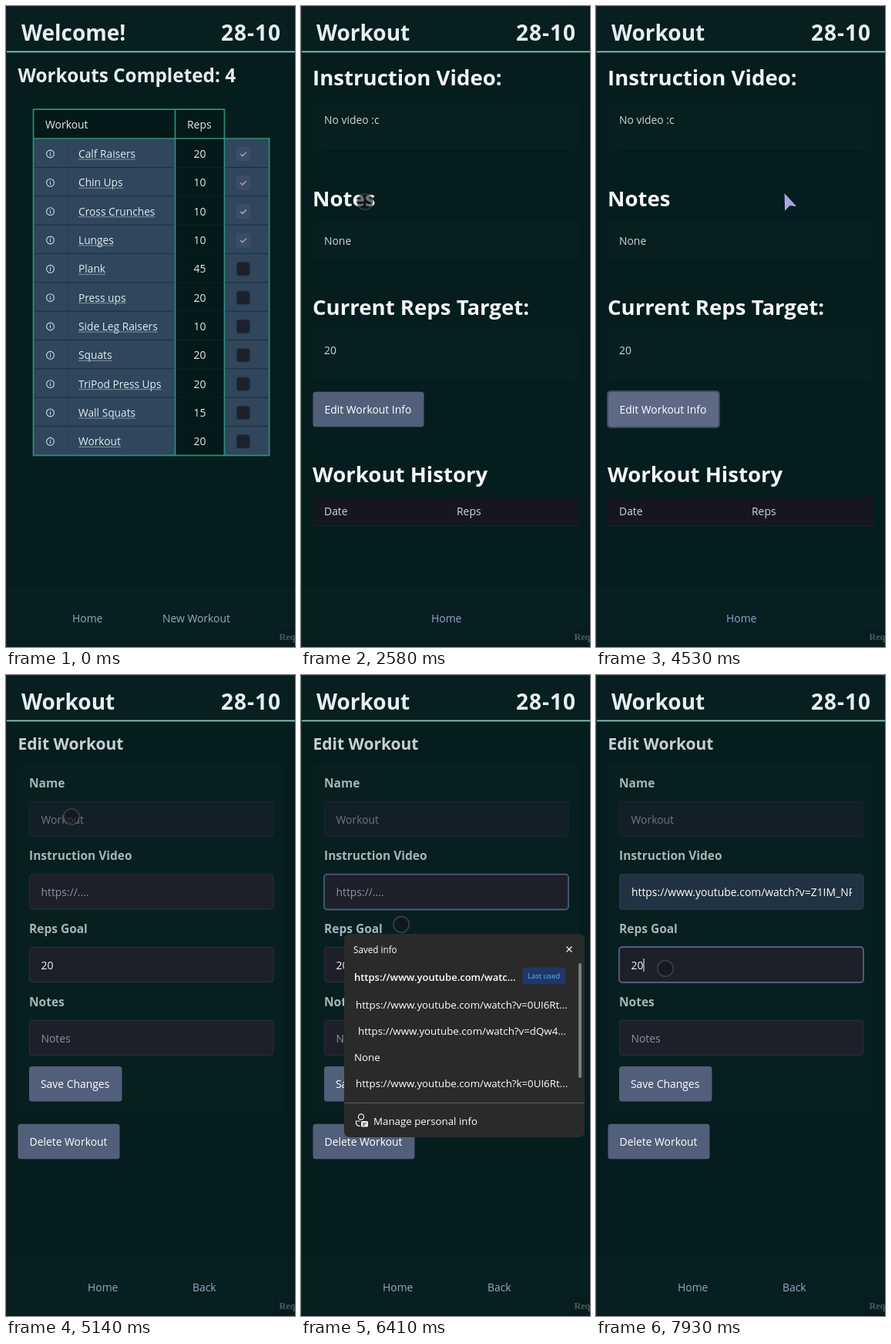
An HTML page that plays this animation: 375 px wide and 832 px high, repeating every 8 s.

```html
<!DOCTYPE html>
<html lang="en">
<head>
<meta charset="utf-8">
<title>Workout tracker</title>
<style>
  html, body { margin: 0; width: 100%; height: 100%; overflow: hidden; background: #051d1e; }
  svg { display: block; width: 100vw; height: 100vh; }
  text { font-family: "Open Sans", "Noto Sans", sans-serif; white-space: pre; }
  .serif { font-family: "Liberation Serif", "Noto Serif", serif; }
</style>
</head>
<body>
<svg id="stage" viewBox="0 0 375 832"></svg>
<script>
const LOOP = 8000;
const TEAL = '#2b8f7c', SLATE = '#525f7a', FIELD = '#1d1f29', NAV = '#98a8c0';
const SOFT = '#d0d6dd', HINT = '#8b93a0';
const BODY = 13.9;
const URL_BASE = 'https://www.youtube.com/watch?';

// Drawing helpers
const text = (x, y, s, size = BODY, fill = SOFT, weight = 400, extra = '') =>
  `<text x="${x}" y="${y}" font-size="${size}" fill="${fill}" font-weight="${weight}" ${extra}>${s}</text>`;
const rect = (x, y, w, h, fill, r = 0, extra = '') =>
  `<rect x="${x}" y="${y}" width="${w}" height="${h}" rx="${r}" fill="${fill}" ${extra}/>`;
const path = (d, stroke, width = 1, extra = '') =>
  `<path d="${d}" fill="none" stroke="${stroke}" stroke-width="${width}" ${extra}/>`;
const group = (id, body) => `<g id="${id}">${body}</g>`;
const h2 = (y, s) => text(15, y, s, 27.6, '#f4f6f8', 700);
const title = s => text(20, 45, s, 28, '#e6eff2', 700);
const button = (x, y, w, s) => rect(x, y, w, 45.5, SLATE, 3.5) + text(x + 15, y + 28, s, BODY, '#fff');
const card = (y, h) =>
  rect(30, y + h, 317, 5, '#041b1c', 3) + rect(15, y, 346, h, '#071f20', 3);
const outline = (id, x, y, w, h, color) =>
  rect(x, y, w, h, 'none', 4, `id="${id}" stroke="${color}" stroke-width="1.8"`);

function frame() {
  return rect(0, 0, 375, 832, '#051d1e') +
    rect(0, 0, 375, 59, '#081f21') +
    rect(0, 755, 375, 77, '#071f21') +
    rect(0, 58.5, 375, 1.8, '#82c6c1') +
    text(279, 45, '28-10', 28, '#e6eff2', 700, 'letter-spacing="1"') +
    rect(348, 808, 27, 24, '#081c20', 3) +
    text(354.5, 823, 'Req', 12, '#4c5b66', 700, 'class="serif"') +
    path('M0.5 832V0.5H375', '#222b2c');
}

const exercises = [
  ['Calf Raisers', 20], ['Chin Ups', 10], ['Cross Crunches', 10], ['Lunges', 10],
  ['Plank', 45], ['Press ups', 20], ['Side Leg Raisers', 10], ['Squats', 20],
  ['TriPod Press Ups', 20], ['Wall Squats', 15], ['Workout', 20]
];
const DONE = 4, ROW = 37.33;

function tableRow([name, reps], i) {
  const y = 192 + i * ROW, done = i < DONE;
  let s = `<circle cx="57.5" cy="${y}" r="4.9" fill="none" stroke="#d3dce4" stroke-width="1.1"/>` +
    path(`M57.5 ${y - 0.9}V${y + 2.6}M57.5 ${y - 2.7}v1.1`, '#d3dce4', 1.1) +
    text(94, y + 5, name, 13.75, '#e4ecf2', 400, 'class="link"') +
    text(251.5, y + 5, reps, BODY, '#e4ecf2', 400, 'text-anchor="middle"') +
    rect(299.3, y - 8.7, 17, 17.4, done ? '#3c4c64' : '#1c212b', 3,
      `stroke="${done ? '#42526a' : '#2a3341'}"`);
  if (done) s += path(`M304.3 ${y + 0.2}l2.6 2.5 4.8 -5`, '#98a4b4', 1.6);
  if (i) {
    const top = y - ROW / 2 - 1.2;
    s += path(`M36 ${top}H219M284 ${top}H341`, '#1b2c3b') + path(`M220 ${top}H283`, '#0b2324');
  }
  return s;
}

function listPage() {
  return title('Welcome!') +
    text(15.5, 99, 'Workouts Completed: 4', 24.3, '#e6edf0', 700) +
    rect(40, 612, 300, 6, '#041b1c', 3) +
    rect(35, 134, 249, 450, '#03191a') +
    rect(35, 172, 185, 412, '#2f465c') + rect(283, 172, 59, 412, '#2f465c') +
    path('M79.5 172V583', '#2a4055') +
    text(51, 158.5, 'Workout', BODY, '#e3ebee') + text(235, 158.5, 'Reps', BODY, '#e3ebee') +
    exercises.map(tableRow).join('') +
    path('M35.5 134.2H283.4V583.4M35.5 133.4V583.4H341.6V172H35.5M219.5 134V583', TEAL, 1.7) +
    text(86, 800, 'Home', BODY, NAV) + text(203, 800, 'New Workout', BODY, NAV);
}

function detailPage() {
  return title('Workout') +
    h2(103, 'Instruction Video:') + card(124, 63) + text(30, 153, 'No video :c') +
    h2(260, 'Notes') + card(279, 50) + text(30, 310, 'None') +
    h2(401, 'Current Reps Target:') + card(421, 65) + text(30, 452, '20') +
    button(15.5, 500.7, 144, 'Edit Workout Info') +
    group('pressed', rect(15, 500, 145, 47, '#5d6985', 4, 'stroke="#3b4a5b" stroke-width="2"') +
      text(30.5, 528.7, 'Edit Workout Info', BODY, '#fff')) +
    h2(618, 'Workout History') + rect(15, 638, 346, 37, '#15171f') +
    path('M15 674.5H361', '#1a232b') +
    text(30, 661, 'Date') + text(202, 661, 'Reps') +
    text(169, 800, 'Home', BODY, '#96a3d2');
}

const label = (y, s) => text(30, y, s, 15.5, '#a7b3bc', 700);
const field = (y, s, fill, bg = FIELD, border = '#2a3040') =>
  rect(30.5, y, 316.5, 45, bg, 3.5, `stroke="${border}"`) + text(45.5, y + 28.3, s, BODY, fill);

function editPage() {
  return title('Workout') +
    text(15.5, 97, 'Edit Workout', 21, '#c7ced8', 700) +
    rect(15, 115, 346, 453, '#071f20', 3) +
    label(146, 'Name') + field(164.5, 'Workout', '#6c7983', '#121f26', '#182830') +
    label(240, 'Instruction Video') + field(259, 'https://....', HINT) +
    group('filled', rect(30.5, 259, 316.5, 45, '#203243', 3.5, 'stroke="#293c4e"') +
      `<clipPath id="inner"><rect x="45" y="262" width="287" height="40"/></clipPath>` +
      text(46, 287, URL_BASE + 'v=Z1IM_NPk4', BODY, '#fff', 400, 'clip-path="url(#inner)"')) +
    outline('videoFocus', 30, 258.7, 317, 45.8, '#465b78') +
    label(334.5, 'Reps Goal') + field(353.5, '20', '#f2f4f6') +
    outline('repsFocus', 30, 353, 317, 46, '#525f84') +
    rect(61.5, 368, 1, 17, '#fff', 0, 'id="caret"') +
    label(430, 'Notes') + field(448.3, 'Notes', HINT) +
    button(30, 508, 120.5, 'Save Changes') + button(15.5, 582.7, 132, 'Delete Workout') +
    text(106, 800, 'Home', BODY, NAV) + text(242, 800, 'Back', BODY, NAV);
}

function popup() {
  const item = (x, y, s, weight = 400, size = 13.3) => text(x, y, s, size, '#fff', weight);
  return rect(56, 336, 312, 264, '#2a2a2a', 7) +
    text(68, 360.5, 'Saved info', 11.7, '#fff') +
    path('M344.5 352.5l7 7m0 -7l-7 7', '#f4f4f4', 1.2) +
    rect(60, 372, 297, 39, '#3b3b3b', 4, 'id="hoverItem"') +
    item(69, 397, 'https://www.youtube.com/watc...', 600, 13) +
    rect(287.3, 379.5, 56.2, 22, '#1f3766', 3) + text(294, 394, 'Last used', 9.5, '#66b6f6') +
    item(71, 433, URL_BASE + 'v=0UI6Rt...') +
    item(74, 467, URL_BASE + 'v=dQw4...') +
    item(69, 501, 'None') +
    item(71, 535, URL_BASE + 'k=0UI6Rt...') +
    rect(360, 374, 4, 149, '#7c7c7c', 2) +
    path('M56 555.5H368', '#5c5c5c') +
    '<circle cx="78" cy="573.5" r="3.6" fill="none" stroke="#f0f0f0" stroke-width="1.2"/>' +
    path('M77 585.5c-5 0 -6 -3 -5.5 -6.5H77', '#f0f0f0', 1.2) +
    rect(78, 579, 9, 7.5, '#f0f0f0', 1.5) + path('M80 582h5M80 584.2h3', '#2a2a2a') +
    item(94, 583.5, 'Manage personal info');
}

function pointer() {
  return group('arrow', '<path d="M-0.5 -1L15.3 16.2L6.5 15L0.1 22Z" fill="#a9a4e2"/>') +
    group('touch', '<circle r="10.2" fill="#14161a" fill-opacity=".6" stroke="#64666a" stroke-opacity=".5" stroke-width="1.6"/>') +
    group('click', '<circle r="11" fill="#b1ae0b" fill-opacity=".72" stroke="#b3af1c" stroke-opacity=".8" stroke-width="1.6"/>');
}

const stage = document.getElementById('stage');
stage.innerHTML = frame() + group('list', listPage()) + group('detail', detailPage()) +
  group('edit', editPage()) + group('popup', popup()) + group('pointer', pointer());
const el = id => document.getElementById(id);

// Link underlines follow the rendered text width
const underlines = [...document.querySelectorAll('.link')].map(link => {
  const x = +link.getAttribute('x'), y = +link.getAttribute('y') + 2;
  link.insertAdjacentHTML('afterend',
    path(`M${x} ${y}h${link.getComputedTextLength()}`, '#8296a5', 1));
  return link.nextSibling;
});
const lastLine = underlines[underlines.length - 1];

// Pointer stops: time, x, y
const stops = [
  [130, 31, 668], [610, 136, 571], [770, 136, 571], [1240, 126, 571],
  [2050, 126, 571], [2320, 90, 226], [2500, 90, 226], [2580, 83, 254],
  [2840, 25, 400], [3130, 6, 517],
  [3520, 43, 245], [3750, 158, 420], [3990, 105, 530],
  [4260, 105, 530], [4530, 245, 244], [4590, 245, 244], [4930, 85, 184],
  [5140, 85, 184], [5440, 90, 330], [5740, 118, 290],
  [6200, 118, 290], [6740, 154, 390],
  [7060, 154, 390], [7480, 90, 381], [8000, 90, 381]
];

function pointerAt(t) {
  const i = Math.max(1, stops.findIndex(s => s[0] > t));
  const [t0, x0, y0] = stops[i - 1], [t1, x1, y1] = stops[i];
  const k = Math.min(1, Math.max(0, (t - t0) / (t1 - t0)));
  const e = k * k * (3 - 2 * k);
  return [x0 + (x1 - x0) * e, y0 + (y1 - y0) * e];
}

const within = (t, ...spans) => spans.some(([a, b]) => t >= a && t < b);
const show = (id, on) => el(id).setAttribute('display', on ? 'inline' : 'none');

function draw(t) {
  show('list', t < 1710);
  show('detail', within(t, [1710, 4590]));
  show('edit', t >= 4590);
  lastLine.setAttribute('stroke', t >= 770 ? '#e0e8ee' : '#8296a5');
  show('pressed', t >= 4190);

  const hovering = t >= 6600;
  show('popup', within(t, [6210, 7060]));
  show('hoverItem', hovering);
  show('filled', hovering);
  show('videoFocus', within(t, [6140, 7680]));
  show('repsFocus', t >= 7680);
  show('caret', t >= 7930);

  const [x, y] = pointerAt(t);
  const clicking = within(t, [4190, 4260], [6070, 6140], [6950, 7020], [7680, 7760]);
  const native = within(t, [4260, 4590], [6450, 7060]);
  show('pointer', within(t, [130, 3130], [3520, LOOP]));
  el('pointer').setAttribute('transform', `translate(${x} ${y})`);
  show('click', clicking);
  show('arrow', native);
  show('touch', !clicking && !native);
}

function tick() {
  draw(performance.now() % LOOP);
  requestAnimationFrame(tick);
}
tick();
</script>
</body>
</html>
```
